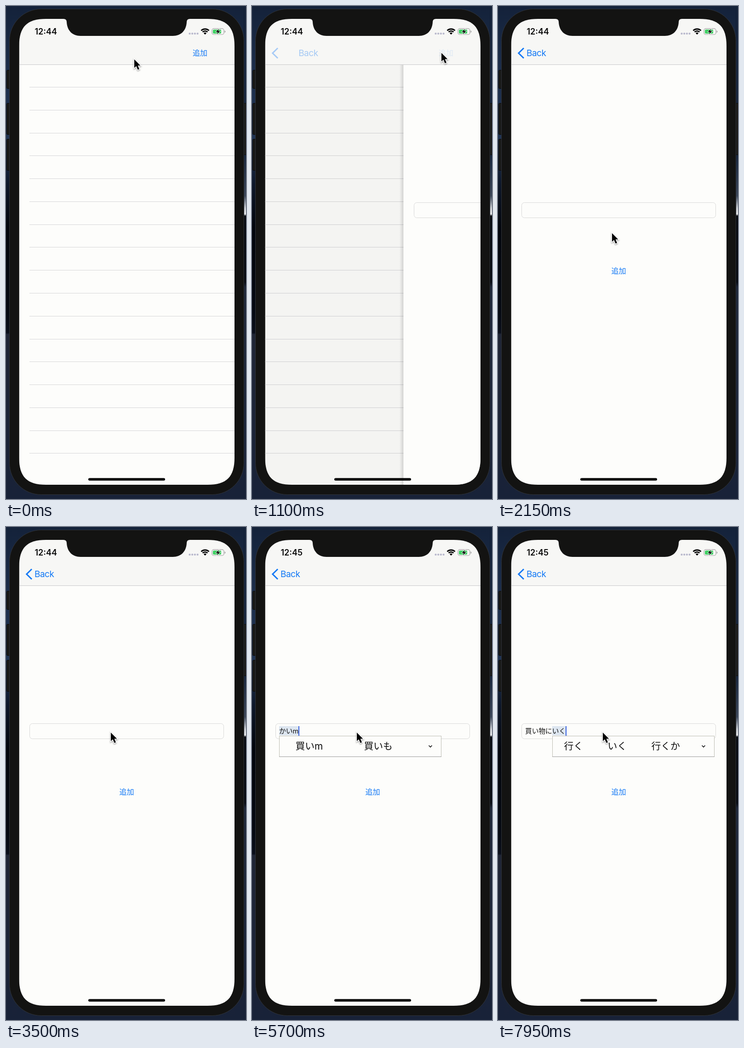
An HTML page with a canvas for the animation above (8 s loop, 522 px wide and 1072 px high).

```html
<!DOCTYPE html>
<html lang="ja">
<head>
<meta charset="utf-8">
<title>Add item</title>
<style>
html, body { margin: 0; width: 522px; height: 1072px; overflow: hidden; background: #101a2b; }
canvas { display: block; }
</style>
</head>
<body>
<canvas id="stage" width="522" height="1072"></canvas>
<script>
const ctx = document.getElementById('stage').getContext('2d');
const LOOP = 8000, STEP = 50;
const FONT = 'Inter, "Noto Sans CJK JP", "Noto Sans CJK", sans-serif';
const BLUE = '#1479f5', PAPER = '#fdfdfb', BAR = '#f7f7f5';
const SCREEN = { x: 28.5, y: 28, w: 468.5, h: 1013, r: 47 };
const BAR_END = 127;
const PUSH_AT = 1030.6, PUSH_RATE = 0.0181;
const FIELD = { x: 51.5, y: 427.5, w: 422, h: 33 };
const TEXT_X = 59;

// time, x, y of the pointer tip
const POINTER = [
  [0, 278, 115], [200, 278, 115], [800, 411, 101], [1350, 411, 101],
  [2100, 247, 493], [2200, 247, 493], [2500, 227, 446]
];

// time, fixed text, marked text, candidates as [text, offset]
const four = (a, b, c, d) => [[a, 32], [b, 105], [c, 181], [d, 257]];
const three = (a, b, c) => [[a, 25.5], [b, 120.5], [c, 215.5]];
const two = (a, b) => [[a, 35.5], [b, 184.5]];
const TYPING = [
  [4850, '', 'k', four('k', 'か', '子', '気')],
  [5100, '', 'か', four('か', '課', '下', '化')],
  [5350, '', 'かい', four('会', '回', '買', '階')],
  [5600, '', 'かいm', two('買いm', '買いも')],
  [5800, '', 'かいも', two('買いも', '買い物')],
  [6050, '', 'かいもn', two('買いもn', '買い物')],
  [6300, '', 'かいもの', two('買い物', '買い物に')],
  [6550, '', 'かいものn', two('買い物n', '買い物に')],
  [6800, '', 'かいものに', two('買い物に', '買い物に行')],
  [7100, '', '買い物に', null],
  [7400, '買い物に', 'い', four('い', '行', '位', '胃')],
  [7650, '買い物に', 'いk', three('行k', 'いk', '行く')],
  [7900, '買い物に', 'いく', three('行く', 'いく', '行くか')]
];

const fill = (color, x, y, w, h) => {
  ctx.fillStyle = color;
  ctx.fillRect(x, y, w, h);
};

function box(x, y, w, h, r) {
  ctx.beginPath();
  ctx.roundRect(x, y, w, h, r);
}

// rounded box whose corners ease into the sides
function softBox({ x, y, w, h, r }) {
  const e = r * 1.25, k = e * 0.292, right = x + w, bottom = y + h;
  ctx.beginPath();
  ctx.moveTo(x + e, y);
  ctx.lineTo(right - e, y);
  ctx.bezierCurveTo(right - k, y, right, y + k, right, y + e);
  ctx.lineTo(right, bottom - e);
  ctx.bezierCurveTo(right, bottom - k, right - k, bottom, right - e, bottom);
  ctx.lineTo(x + e, bottom);
  ctx.bezierCurveTo(x + k, bottom, x, bottom - k, x, bottom - e);
  ctx.lineTo(x, y + e);
  ctx.bezierCurveTo(x, y + k, x + k, y, x + e, y);
}

function poly(points) {
  ctx.beginPath();
  points.forEach(([x, y], i) => i ? ctx.lineTo(x, y) : ctx.moveTo(x, y));
}

function text(str, x, y, size, color, weight = 400, spacing = 0) {
  ctx.font = `${weight} ${size}px ${FONT}`;
  ctx.letterSpacing = spacing + 'px';
  ctx.fillStyle = color;
  ctx.fillText(str, x, y);
  const w = ctx.measureText(str).width;
  ctx.letterSpacing = '0px';
  return w;
}

function gradient(x0, y0, x1, y1, stops) {
  const g = ctx.createLinearGradient(x0, y0, x1, y1);
  stops.forEach(([at, color]) => g.addColorStop(at, color));
  return g;
}

// critically damped spring
function pushProgress(t) {
  const k = Math.max(0, t - PUSH_AT) * PUSH_RATE;
  return k > 14 ? 1 : 1 - (1 + k) * Math.exp(-k);
}

function pointerAt(t) {
  const i = POINTER.findIndex(p => p[0] > t);
  if (i < 0) return POINTER[POINTER.length - 1].slice(1);
  const [t0, x0, y0] = POINTER[i - 1], [t1, x1, y1] = POINTER[i];
  const u = (t - t0) / (t1 - t0), e = u * u * (3 - 2 * u);
  return [x0 + (x1 - x0) * e, y0 + (y1 - y0) * e];
}

function drawDesktop() {
  fill(gradient(0, 0, 0, 1072, [
    [0, '#14223a'], [0.12, '#1b2c49'], [0.28, '#203453'], [0.36, '#0d172a'],
    [0.45, '#02050c'], [0.62, '#050912'], [0.663, '#090e1a'],
    [0.666, '#1f2536'], [1, '#182238']
  ]), 0, 0, 522, 1072);
  fill(gradient(0, 0, 0, 1072, [
    [0, '#14223a'], [0.3, '#14223a'], [0.385, '#3a4558'], [0.41, '#c6cad0'],
    [0.422, '#e2e4e7'], [0.426, '#05080f'], [0.56, '#05080f'], [0.57, '#1c2538'], [1, '#182238']
  ]), 516, 0, 6, 1072);
}

function drawBody() {
  ctx.fillStyle = '#191918';
  ctx.strokeStyle = '#080808';
  ctx.lineWidth = 1;
  for (const [x, y, h] of [[1.5, 139.5, 40], [1.5, 211.5, 68], [1.5, 289.5, 68], [515, 211.5, 112]]) {
    box(x, y, 9, h, 2);
    ctx.fill();
    ctx.stroke();
  }
  box(7.5, 6.5, 510, 1056, 69);
  ctx.fillStyle = '#131312';
  ctx.fill();
  ctx.strokeStyle = '#30343a';
  ctx.stroke();
}

function drawList(p) {
  const shift = -0.3 * SCREEN.w * p;
  fill(PAPER, SCREEN.x, BAR_END, SCREEN.w, 915);
  for (let i = 0; i < 17; i++) {
    fill('#d6d6d8', 51 + shift, Math.floor(176.6 + i * 49.77), SCREEN.w, 1);
  }
  fill(`rgba(0,0,0,${0.1 * p})`, SCREEN.x, BAR_END, SCREEN.w, 915);
}

function drawForm(p, t) {
  const off = Math.round(SCREEN.w * (1 - p)), edge = SCREEN.x + off;
  if (p < 1) {
    const a = 0.22 * (1 - p);
    fill(gradient(edge - 9, 0, edge, 0, [[0, 'rgba(0,0,0,0)'], [1, `rgba(0,0,0,${a})`]]),
      edge - 9, BAR_END, 9, 915);
  }
  fill(PAPER, edge, BAR_END, SCREEN.w, 915);
  box(FIELD.x + off, FIELD.y, FIELD.w, FIELD.h, 6);
  ctx.strokeStyle = '#d9d9d9';
  ctx.lineWidth = 1;
  ctx.stroke();
  text('追加', 246.5 + off, 582, 16, BLUE);
  if (t >= 2700) drawInput(t);
}

function drawInput(t) {
  const state = TYPING.filter(s => s[0] <= t).pop();
  const caret = x => fill('#3a63e0', Math.round(x), 433, 2, 21);
  if (!state) {
    if ((t - 2700) % 1000 < 600) caret(TEXT_X);
    return;
  }
  const [, done, marked, options] = state;
  const size = 14.7, base = 448.5;
  const start = TEXT_X + (done ? text(done, TEXT_X, base, size, '#111') : 0);
  ctx.font = `400 ${size}px ${FONT}`;
  const w = ctx.measureText(marked).width;
  fill('#dde6f0', start, 433, w, 20);
  text(marked, start, base, size, '#111');
  caret(start + w);
  if (options) drawOptions(Math.round(start), options);
}

function drawOptions(x, options) {
  fill(PAPER, x, 454, 353, 46);
  ctx.strokeStyle = '#bdbdb3';
  ctx.lineWidth = 1;
  ctx.strokeRect(x + 0.5, 454.5, 352, 45);
  fill('#9b9b9b', x, 499, 353, 1);
  for (const [str, dx] of options) text(str, x + dx, 484, 20.8, '#0c0c0c');
  poly([[x + 325.5, 475], [x + 329, 478.5], [x + 332.5, 475]]);
  ctx.strokeStyle = '#111';
  ctx.lineWidth = 1.6;
  ctx.stroke();
}

function drawBar(p) {
  fill(BAR, SCREEN.x, 28, SCREEN.w, 99);
  fill('#c8c8ca', SCREEN.x, BAR_END, SCREEN.w, 1);
  ctx.globalAlpha = Math.max(0, 1 - p * 2.5);
  text('追加', 406, 108, 16, BLUE);
  ctx.globalAlpha = p;
  text('Back', 62 + 61 * (1 - p), 109, 19, BLUE, 400, -0.5);
  poly([[56, 91.5], [44.8, 102.5], [56, 113.5]]);
  ctx.strokeStyle = BLUE;
  ctx.lineWidth = 3;
  ctx.stroke();
  ctx.globalAlpha = 1;
}

function drawStatus(t) {
  text(t < 3600 ? '12:44' : '12:45', 62.5, 62, 18, '#0a0a0a', 600);
  ctx.fillStyle = '#b9b9cd';
  for (let i = 0; i < 4; i++) {
    box(397.5 + i * 5.7, 58, 4, 4, 1.5);
    ctx.fill();
  }

  const wave = (r, width) => {
    ctx.beginPath();
    ctx.arc(433, 62, r, -Math.PI * 0.75, -Math.PI * 0.25);
    ctx.lineWidth = width;
    ctx.stroke();
  };
  ctx.strokeStyle = ctx.fillStyle = '#050505';
  wave(12, 2.9);
  wave(7.7, 2.7);
  ctx.beginPath();
  ctx.moveTo(433, 62.3);
  ctx.arc(433, 62, 4.4, -Math.PI * 0.75, -Math.PI * 0.25);
  ctx.fill();

  box(448, 49.2, 26, 12.8, 3.8);
  ctx.strokeStyle = '#a2a2a2';
  ctx.lineWidth = 1.2;
  ctx.stroke();
  box(450, 51.2, 18, 8.8, 2);
  ctx.fillStyle = '#3ed062';
  ctx.fill();
  box(475.6, 53.5, 1.8, 4.4, [0, 2, 2, 0]);
  ctx.fillStyle = '#a2a2a2';
  ctx.fill();
  poly([[463, 49.8], [456.2, 56.6], [460.4, 56.6], [458.8, 61.6], [466, 54.6], [461.6, 54.6]]);
  ctx.closePath();
  ctx.strokeStyle = BAR;
  ctx.lineWidth = 1.4;
  ctx.stroke();
  ctx.fillStyle = '#050505';
  ctx.fill();
}

function drawNotch() {
  ctx.beginPath();
  ctx.moveTo(125, 26);
  ctx.lineTo(125, 28);
  ctx.quadraticCurveTo(132, 28, 132, 35);
  ctx.bezierCurveTo(133, 54, 145, 65, 162, 65);
  ctx.lineTo(363, 65);
  ctx.bezierCurveTo(380, 65, 392, 54, 393, 35);
  ctx.quadraticCurveTo(393, 28, 400, 28);
  ctx.lineTo(400, 26);
  ctx.fillStyle = '#131312';
  ctx.fill();
}

function drawPointer(x, y) {
  ctx.save();
  ctx.translate(x + 1, y + 1);
  poly([[0, 0], [0, 18.6], [4.3, 14.8], [7.6, 22.6], [11, 21.2], [7.7, 13.6], [13.4, 13.4]]);
  ctx.closePath();
  ctx.shadowColor = 'rgba(0,0,0,0.4)';
  ctx.shadowBlur = 3;
  ctx.shadowOffsetY = 1.5;
  ctx.strokeStyle = '#fff';
  ctx.lineWidth = 2.8;
  ctx.stroke();
  ctx.shadowColor = 'transparent';
  ctx.fillStyle = '#000';
  ctx.fill();
  ctx.restore();
}

function draw(t) {
  const p = pushProgress(t);
  drawDesktop();
  drawBody();
  ctx.save();
  softBox(SCREEN);
  ctx.clip();
  if (p < 1) drawList(p);
  if (p > 0) drawForm(p, t);
  drawBar(p);
  drawStatus(t);
  box(179, 1026.5, 167, 5.5, 2.75);
  ctx.fillStyle = '#000';
  ctx.fill();
  ctx.restore();
  drawNotch();
  drawPointer(...pointerAt(t));
}

const begin = performance.now();
function tick() {
  const t = (performance.now() - begin) % LOOP;
  draw(Math.floor(t / STEP) * STEP);
  requestAnimationFrame(tick);
}
tick();
</script>
</body>
</html>
```
